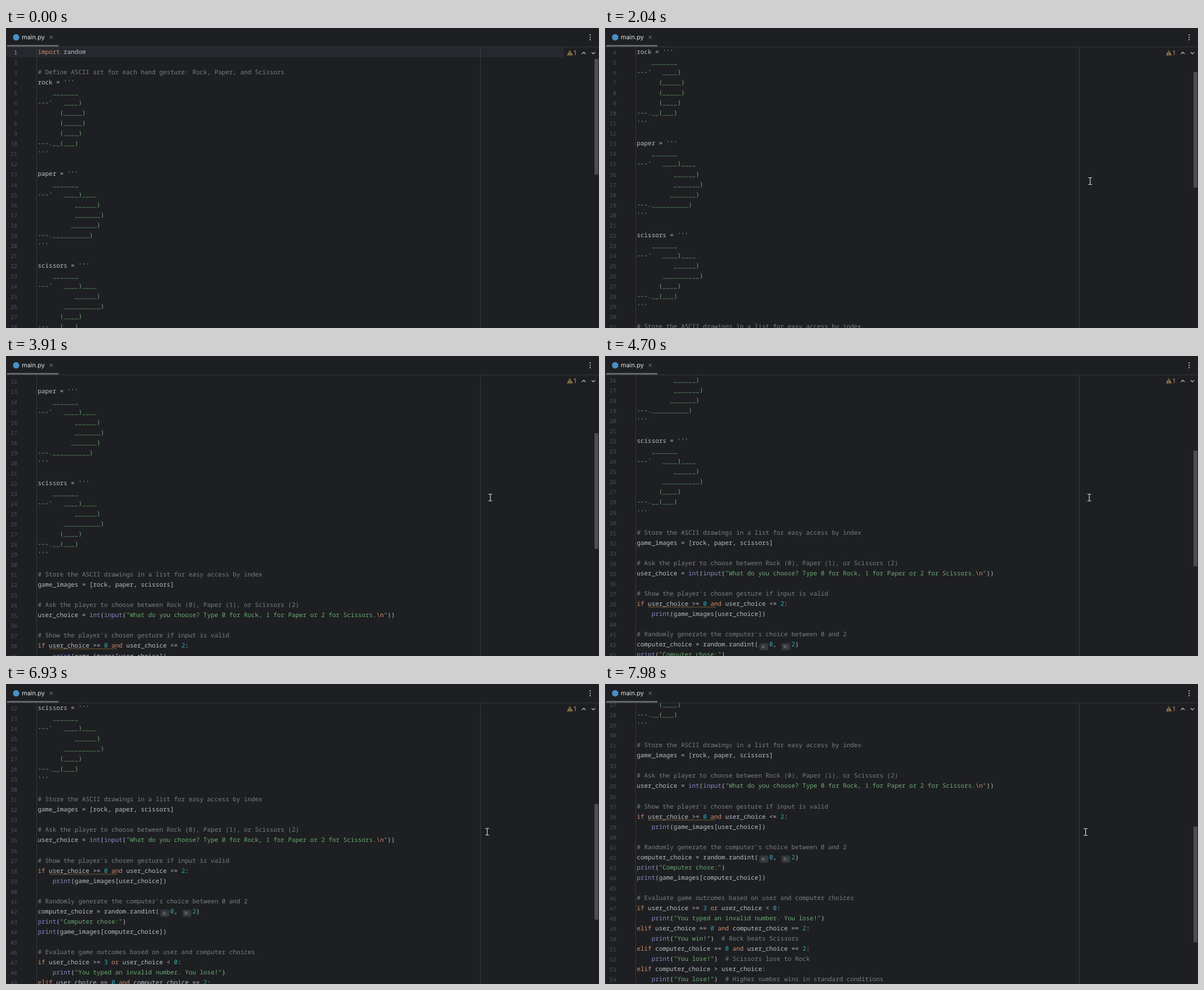
Recreate the animation shown at these times as an HTML page. Size 1053x532 px, loop 8000 ms.

```html
<!DOCTYPE html>
<html lang="en">
<head>
<meta charset="utf-8">
<title>main.py</title>
<style>
  html, body { margin: 0; width: 100%; height: 100%; overflow: hidden; background: #1e1f22; }
  #stage { position: relative; width: 1053px; height: 532px; overflow: hidden; background: #1e1f22; }
  #stage * { box-sizing: border-box; }
  .abs, .line, .num, .code { position: absolute; }
  #editor { left: 0; top: 34px; width: 1053px; height: 498px; overflow: hidden; }
  #doc { left: 0; top: 0; width: 100%; }
  .line { left: 0; width: 990px; height: 18.04px; }
  .line, .tab { text-rendering: geometricPrecision; font-kerning: none; white-space: pre; }
  .line { font: 10.9px/18.04px "Noto Sans Mono", "DejaVu Sans Mono", monospace; font-variant-ligatures: none; }
  .code { left: 56.5px; color: #bcbec4; }
  .num { left: 0; width: 20px; text-align: right; font-size: 10px; color: #4b5059; }
  .line:first-child { background: #26282e; }
  .line:first-child .num { color: #a1a3ab; }
  .kw, .esc { color: #cf8e6d; }
  .fn { color: #8888c6; }
  .str { color: #6aab73; }
  .com { color: #7a7e85; }
  .lit { color: #2aacb8; }
  .bar { position: relative; left: .5px; font-size: 9px; letter-spacing: 1.14px; line-height: 0; }
  .hint { display: inline-block; width: 16px; height: 13px; margin: 0 1.8px; border-radius: 3px;
    background: #34363a; color: #868a91; font: 9px/13px Inter, sans-serif; text-align: center; vertical-align: -2.5px; }
  .tab { left: 28px; top: 8px; font: 11px/17px Inter, sans-serif; color: #dfe1e5; }
  #thumb { left: 1045px; top: 21px; width: 7px; height: 205px; background: #4d4e51; }
  svg { position: absolute; left: 0; top: 0; overflow: visible; fill: none; }
</style>
</head>
<body>
<div id="stage">
  <div id="editor" class="abs">
    <div id="doc" class="abs"></div>
    <div class="abs" style="left:54px;top:0;width:1px;height:498px;background:#35373b"></div>
    <div class="abs" style="left:842px;top:0;width:1px;height:498px;background:#393b40"></div>
    <div id="thumb" class="abs"></div>
  </div>
  <div class="abs" style="left:0;top:33px;width:1053px;height:1px;background:#35373b"></div>
  <div class="abs" style="left:2px;top:30px;width:91px;height:3px;background:#62656b"></div>
  <div class="abs" style="left:0;top:0;width:1px;height:532px;background:#2b2d30"></div>
  <div class="abs tab">main.py</div>
  <svg width="1053" height="532">
    <circle cx="18" cy="16.5" r="5.7" fill="#4a8fc4"/>
    <path d="M77.5 13.8l5.4 5.4m0-5.4l-5.4 5.4" stroke="#868a91"/>
    <g fill="#ced0d6">
      <circle cx="1037.3" cy="12.3" r="1.1"/><circle cx="1037.3" cy="16.5" r="1.1"/><circle cx="1037.3" cy="20.7" r="1.1"/>
    </g>
    <path d="M1001.3 40.2l4.5 7.8h-9z" fill="#8d7346" stroke="#8d7346" stroke-width="1.2" stroke-linejoin="round"/>
    <path d="M1001.3 42v3m0 1v1.2" stroke="#1e1f22" stroke-width="1.1"/>
    <text x="1008" y="48.2" font-family="Inter, sans-serif" font-size="11" fill="#b39a68">1</text>
    <path d="M1022.8 46l3.2-3.2 3.2 3.2m10.6-3.2l3.2 3.2 3.2-3.2" stroke="#ced0d6" stroke-width="1.1"/>
    <g id="mouse" stroke="#e4e4e6" stroke-width="1.1">
      <path d="M-3.3-6h2.5l.8.8.8-.8h2.5M-3.3 6h2.5l.8-.8.8.8h2.5M0-5.2v10.4"/>
    </g>
  </svg>
</div>
<script>
const LOOP = 8000, LINE_H = 18.04, CHAR_W = 6.54;

const SOURCE = String.raw`import random

# Define ASCII art for each hand gesture: Rock, Paper, and Scissors
rock = '''
    _______
---'   ____)
      (_____)
      (_____)
      (____)
---.__(___)
'''

paper = '''
    _______
---'   ____)____
          ______)
          _______)
         _______)
---.__________)
'''

scissors = '''
    _______
---'   ____)____
          ______)
       __________)
      (____)
---.__(___)
'''

# Store the ASCII drawings in a list for easy access by index
game_images = [rock, paper, scissors]

# Ask the player to choose between Rock (0), Paper (1), or Scissors (2)
user_choice = int(input("What do you choose? Type 0 for Rock, 1 for Paper or 2 for Scissors.\n"))

# Show the player's chosen gesture if input is valid
if user_choice >= 0 and user_choice <= 2:
    print(game_images[user_choice])

# Randomly generate the computer's choice between 0 and 2
computer_choice = random.randint({a:}0, {b:}2)
print("Computer chose:")
print(game_images[computer_choice])

# Evaluate game outcomes based on user and computer choices
if user_choice >= 3 or user_choice < 0:
    print("You typed an invalid number. You lose!")
elif user_choice == 0 and computer_choice == 2:
    print("You win!")  # Rock beats Scissors
elif computer_choice == 0 and user_choice == 2:
    print("You lose!")  # Scissors lose to Rock
elif computer_choice > user_choice:
    print("You lose!")  # Higher number wins in standard conditions`;

const TOKEN = new RegExp([
  "(?<art>'''[^]*?''')", "(?<com>#.*)", '(?<str>"[^"]*")', "(?<hint>\\{\\w:\\})",
  "(?<kw>\\b(?:import|if|elif|and|or)\\b)", "(?<fn>\\b(?:int|input|print)\\b)", "(?<lit>\\b\\d+\\b)"
].join("|"), "g");

const doc = document.getElementById("doc");
let code;

function add(parent, cls, text = "") {
  const el = document.createElement(cls === "line" || cls === "num" || cls === "code" ? "div" : "span");
  el.className = cls;
  el.textContent = text;
  return parent.appendChild(el);
}

function newLine() {
  const n = doc.children.length, line = add(doc, "line");
  line.style.top = n * LINE_H + "px";
  add(line, "num", n + 1);
  code = add(line, "code");
}

// Splits text by a pattern and styles the matching parts
function addParts(cls, text, pattern, special) {
  const box = add(code, cls);
  text.split(pattern).forEach((part, i) => {
    if (i % 2) add(box, special, part);
    else box.append(part);
  });
}

function emit(kind, text) {
  text.split("\n").forEach((row, i) => {
    if (i) newLine();
    if (!row) return;
    if (kind === "art") addParts("str", row, /(_+)/, "bar");
    else if (kind === "str") addParts("str", row, /(\\n)/, "esc");
    else if (kind === "hint") add(code, "hint", row.slice(1, -1));
    else if (kind) add(code, kind, row);
    else code.append(row);
  });
}

newLine();
let pos = 0;
for (const m of SOURCE.matchAll(TOKEN)) {
  emit("", SOURCE.slice(pos, m.index));
  emit(Object.keys(m.groups).find(k => m.groups[k]), m[0]);
  pos = m.index + m[0].length;
}
emit("", SOURCE.slice(pos));

// Warning wave below the condition on line 38
let wave = `M${3 * CHAR_W} 15`;
for (let i = 0; i < 60; i++) wave += `l2 ${i % 2 ? 1.6 : -1.6}`;
doc.children[37].lastChild.insertAdjacentHTML("beforeend",
  `<svg width="1" height="1"><path d="${wave}" stroke="#94713f" stroke-width=".9"/></svg>`);

// [time, scroll offset]
const SCROLL = [
  [0, 0],
  [1820, 4], [1890, 27], [1960, 47], [2040, 54.1],
  [2700, 59], [2760, 84], [2820, 102], [2870, 108.2],
  [3300, 118], [3390, 152], [3470, 162.4],
  [3840, 167], [3910, 196], [4010, 213], [4090, 216.5],
  [4530, 227], [4620, 261], [4700, 270.6],
  [6680, 272.4], [6740, 296], [6800, 330], [6860, 361], [6930, 378.9],
  [7180, 383], [7250, 408], [7320, 426], [7400, 433], [7520, 433],
  [7890, 441], [7980, 474.9]
];

// [time, x, y]; the pointer sweeps in from the lower right first
const MOUSE = [[0, -50, -50]];
for (let i = 0; i < 8; i++) {
  const k = (1 - i / 7) ** 2;
  MOUSE.push([370 + i * 68.5, 857 + 165 * k, 295 + 175 * k]);
}
MOUSE.push(
  [1050, 857, 291], [1160, 858.5, 284], [1270, 860.5, 276], [1370, 861.5, 271.5],
  [2300, 861.3, 265], [2360, 860.5, 256], [2420, 860, 251],
  [6740, 859, 253], [6800, 857, 257], [6860, 855.5, 260], [6930, 854.5, 262],
  [7520, 853.5, 262.5]
);

const thumb = document.getElementById("thumb");
const mouse = document.getElementById("mouse");
const at = (steps, t) => steps.findLast(s => s[0] <= t);

function draw() {
  const t = performance.now() % LOOP;
  const y = at(SCROLL, t)[1], [, mx, my] = at(MOUSE, t);
  doc.style.top = -y + "px";
  thumb.style.top = 21 + y * 0.416 + "px";
  mouse.setAttribute("transform", `translate(${mx} ${my})`);
  requestAnimationFrame(draw);
}
draw();
</script>
</body>
</html>
```
